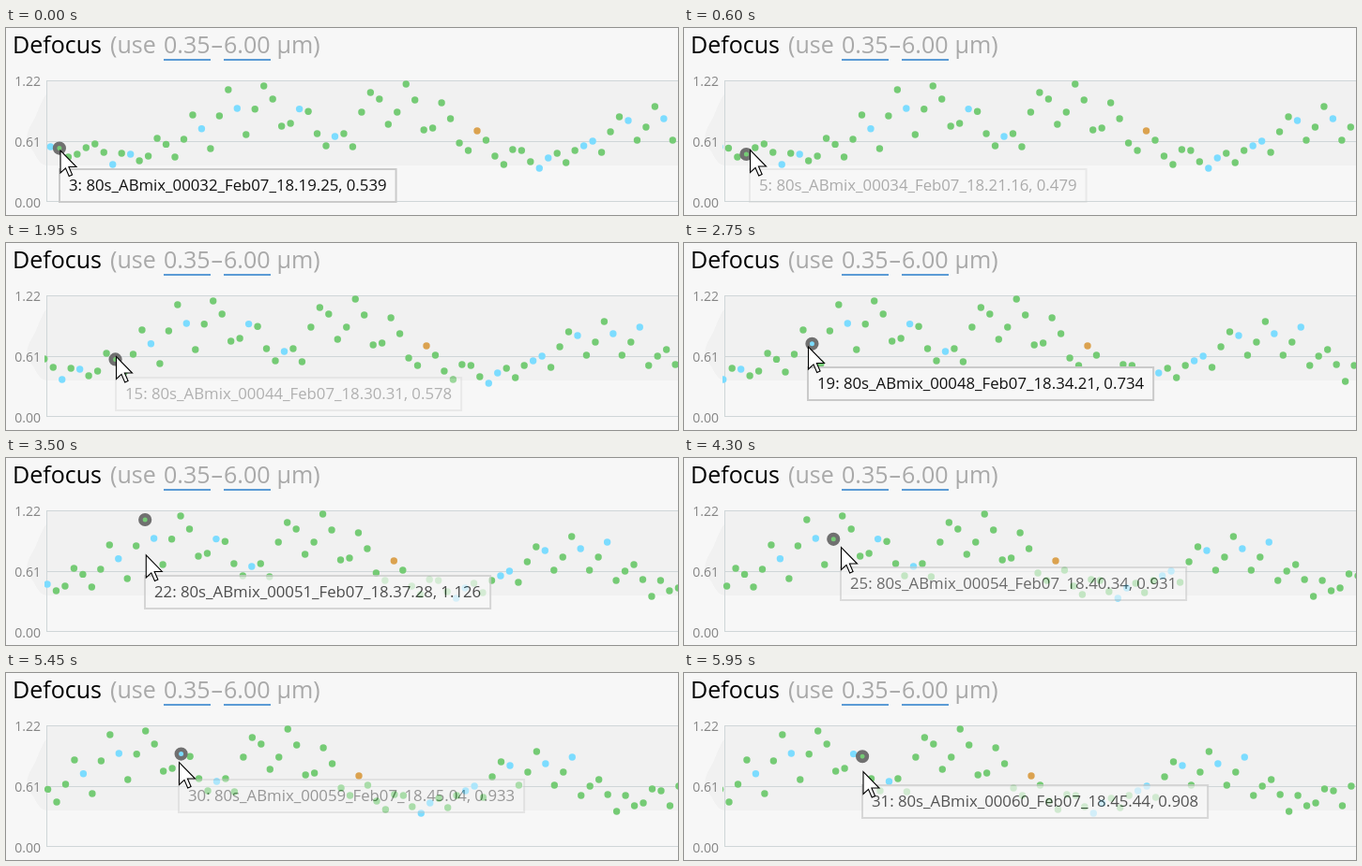
Write an HTML page that moves like this. It is 716 px wide and 200 px high and loops after 6 s.

```html
<!DOCTYPE html>
<html lang="en">
<head>
<meta charset="utf-8">
<title>Defocus</title>
<style>
  html, body { margin: 0; width: 100%; height: 100%; overflow: hidden; background: #f7f7f7; }
  svg { display: block; width: 716px; height: 200px; font-family: "Open Sans", "Noto Sans", sans-serif; }
  .title { font-size: 25px; fill: #a9a9a9; }
  .title .name { fill: #000; }
  .links { stroke: #5b9bd5; stroke-width: 2; }
  .axis { font-size: 14px; fill: #858585; text-anchor: end; }
  .grid { stroke: #cfd6d8; }
  .band { fill: #f1f1f1; }
  #halo { fill: none; stroke: #707070; stroke-width: 4.6; }
  #tip rect { fill: #f7f7f7; stroke: #cacaca; stroke-width: 2; }
  #tip text { font-size: 16.75px; fill: #111; }
</style>
</head>
<body>
<svg viewBox="0 0 716 200">
  <defs><clipPath id="plot"><rect x="41" y="40" width="675" height="160"/></clipPath></defs>
  <g class="title">
    <text class="name" x="7" y="27">Defocus</text>
    <text x="111" y="27">(use</text>
    <text x="168" y="27">0.35</text>
    <text x="218.5" y="27">–</text>
    <text x="232" y="27">6.00</text>
    <text x="288.5" y="27">µm)</text>
  </g>
  <path class="links" d="M168 34H218M232 34H282"/>
  <path class="band" d="M43 56H716V147H43C36 146 33 139 29 132C24 126 21 120 23 112C25 105 30 99 33 91C36 84 39 75 43 71Z"/>
  <path class="grid" d="M43.5 56V186M43 56.5H716M43 121.5H716M43 185.5H716"/>
  <g class="axis">
    <text x="37" y="61.5">1.22</text>
    <text x="37" y="126.5">0.61</text>
    <text x="37" y="191.5">0.00</text>
  </g>
  <g clip-path="url(#plot)">
    <g id="dots"><circle id="halo" r="4.8"/></g>
  </g>
  <g id="tip"><rect x="1" y="1" height="35"/><text x="11" y="24"></text></g>
  <path id="cursor" d="M0 0V24L5.5 18.9L9.2 27.5L12.6 26L8.9 17.5H17Z" fill="#fff" stroke="#000" stroke-width="1.1"/>
</svg>
<script>
const LOOP = 6000, STEP = 50, GAP = 9.47, PIVOT = 50, FIRST = 2;
const BASE = 186, UNIT = 130 / 1.22;

// Dot heights in pixels, starting with number FIRST
const heights = [
  127, 128.57, 138, 135, 128, 124, 133, 146, 134, 135, 142, 137, 118, 124.41, 138, 119, 93, 107.79,
  129, 94, 66, 86, 114, 86.8, 62, 76, 105, 102, 86.58, 89.25, 113, 126, 116, 113, 127, 90, 69, 76,
  103, 90, 60, 77, 109, 107, 80, 97, 123, 131, 110, 120, 137, 146, 130, 131, 143, 150, 139, 134,
  144, 131, 126, 121, 133, 111, 95, 99, 120, 106, 84, 97, 120, 106, 90, 131, 121, 114, 130, 148,
  131, 142, 139, 124, 126, 142, 121];
const blue = new Set([2, 9, 11, 19, 23, 30, 34, 57, 58, 62, 63, 67, 71, 74]);

// time, cursor x, cursor y, tooltip y, x of the pivot dot, hover progress
const path = [
  [0, 58, 131, 149.5, 502, 3.8],
  [150, 58, 131, 149.5, 502, 3.8],
  [1100, 84.5, 130, 150, 482, 7.1],
  [1450, 98, 130.5, 150, 468, 10.5],
  [1950, 117.5, 121.5, 143, 448, 15.35],
  [2100, 120.5, 116, 135, 444.5, 16.2],
  [2750, 132.5, 111, 131.5, 430, 19.8],
  [3400, 147, 105, 126, 415.5, 22.2],
  [4300, 167.5, 95.5, 116, 396, 25.5],
  [5450, 184.5, 95.5, 113, 376, 30.4],
  [5950, 191, 105.5, 119, 370, 31.55]];
// dot number, seconds after 18:00
const clock = [[3, 1165], [15, 1831], [19, 2061], [25, 2434], [30, 2704], [31, 2744]];

const $ = s => document.querySelector(s);
const dots = $('#dots'), halo = $('#halo'), tip = $('#tip'), cursor = $('#cursor');
const box = $('#tip rect'), label = $('#tip text');
const pad = (n, len) => String(n).padStart(len, '0');
const yOf = i => heights[i - FIRST];
const xOf = i => (i - PIVOT) * GAP;
const move = (el, x, y) => el.setAttribute('transform', `translate(${x} ${y})`);

function sample(keys, at) {
  let k = 1;
  while (k < keys.length - 1 && keys[k][0] < at) k++;
  const a = keys[k - 1], b = keys[k];
  const f = Math.min(1, Math.max(0, (at - a[0]) / (b[0] - a[0])));
  return a.slice(1).map((v, n) => v + (b[n + 1] - v) * f);
}

function describe(i) {
  const s = Math.round(sample(clock, i)[0]);
  const value = ((BASE - yOf(i)) / UNIT).toFixed(3);
  return `${i}: 80s_ABmix_${pad(i + 29, 5)}_Feb07_18.${pad(Math.floor(s / 60), 2)}.${pad(s % 60, 2)}, ${value}`;
}

const marks = heights.map((y, n) => {
  const i = n + FIRST, c = document.createElementNS('http://www.w3.org/2000/svg', 'circle');
  c.setAttribute('cx', xOf(i));
  c.setAttribute('cy', y);
  c.setAttribute('r', 3.7);
  c.setAttribute('fill', i === PIVOT ? '#dba24f' : blue.has(i) ? '#7cdcff' : '#75cb75');
  return dots.insertBefore(c, halo);
});

let shown = -1;
function hover(i) {
  if (i === shown) return;
  shown = i;
  halo.setAttribute('cx', xOf(i));
  halo.setAttribute('cy', yOf(i));
  label.textContent = describe(i);
  box.setAttribute('width', label.getComputedTextLength() + 20);
}

function draw(now) {
  const t = Math.floor(now % LOOP / STEP) * STEP;
  const [x, y, tipY, pivot, progress] = sample(path, t);
  const i = Math.floor(progress);
  hover(i);
  move(dots, pivot, 0);
  move(cursor, x, y);
  move(tip, Math.round(x - 2), Math.round(tipY));
  tip.setAttribute('opacity', Math.min(1, Math.max(0, (progress - i - 0.2) * 2)));
}

const start = performance.now();
function tick() {
  draw(performance.now() - start);
  requestAnimationFrame(tick);
}
tick();
</script>
</body>
</html>
```
